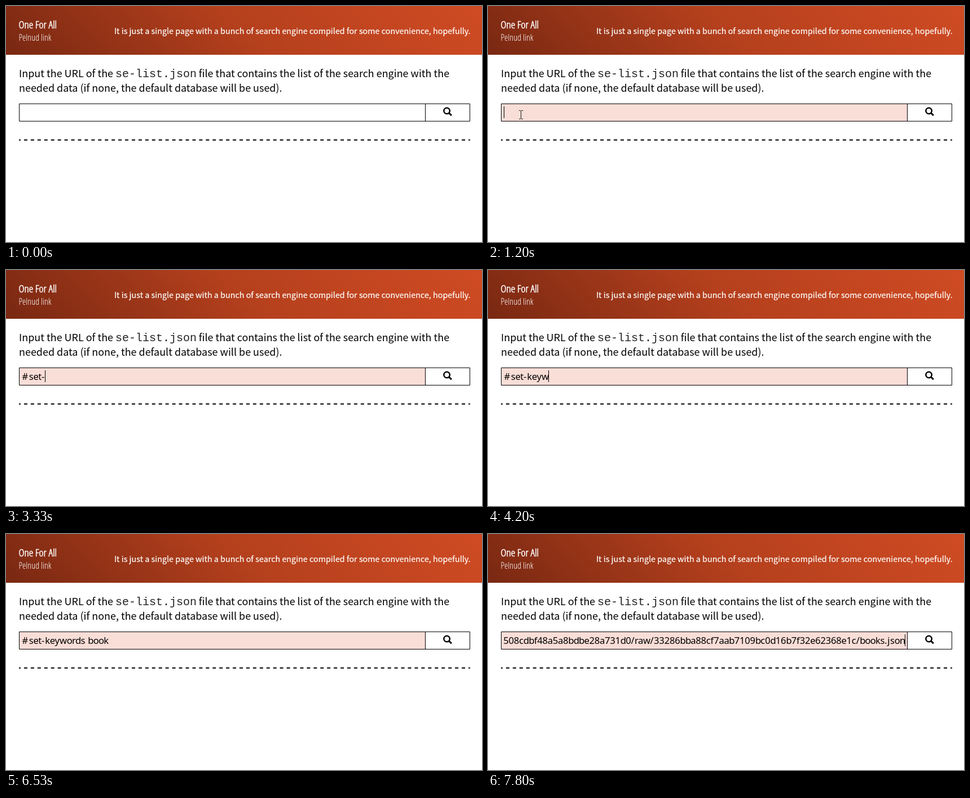
These frames come from a looping animation (844x421 px, 8 s). An HTML page:

```html
<!DOCTYPE html>
<html lang="en">
<head>
<meta charset="utf-8">
<title>One For All</title>
<style>
  html, body { margin: 0; width: 100%; height: 100%; overflow: hidden; background: #fff; }
  svg { display: block; width: 844px; height: 421px; }
  text { white-space: pre; }
  .body { font: 17.94px "Noto Sans CJK JP", "Noto Sans CJK SC", "Noto Sans CJK", sans-serif; }
  .tagline { font-size: 14.35px; fill: #fff; stroke: #fff; stroke-width: .2px; }
  .code { font: 20px "Liberation Mono", "Courier New", monospace; fill: #222; }
  .brand { font-family: "Open Sans Condensed Light", "Open Sans", sans-serif; font-weight: 300; fill: #fff; }
  #title { font-size: 19.2px; stroke: #fff; stroke-width: .6px; }
  #link { font-size: 16px; }
  #typed { font: 16.6px "Noto Sans", "Open Sans", sans-serif; }
</style>
</head>
<body>
<svg viewBox="0 0 844 421" xmlns="http://www.w3.org/2000/svg">
  <defs>
    <linearGradient id="rust" gradientUnits="userSpaceOnUse" x1="189.25" y1="276.25" x2="654.75" y2="-189.25">
      <stop offset="0" stop-color="#792812"/>
      <stop offset=".5" stop-color="#b5401d"/>
      <stop offset="1" stop-color="#cf4b23"/>
    </linearGradient>
    <clipPath id="inner"><rect x="27" y="175" width="714" height="30"/></clipPath>
  </defs>

  <rect width="844" height="87" fill="url(#rust)"/>
  <g class="brand" id="brand" transform="translate(22.5 0)">
    <text id="title" y="40">One For All</text>
    <text id="link" y="62">Pelnud link</text>
  </g>
  <text class="body tagline" x="191.9" y="50">It is just a single page with a bunch of search engine compiled for some convenience, hopefully.</text>

  <text class="body" x="23" y="127">Input the URL of the</text>
  <text class="code" x="194" y="127">se-list.json</text>
  <text class="body" x="341.7" y="127">file that contains the list of the search engine with the</text>
  <text class="body" x="23" y="153">needed data (if none, the default database will be used).</text>

  <rect id="field" x="24" y="175" width="719" height="30" fill="#fff"/>
  <g clip-path="url(#inner)"><text id="typed" y="196"></text></g>
  <rect id="caret" y="179" width="1" height="21"/>
  <path d="M23.5 174.5H822.5V205.5H23.5ZM743.5 174V206" fill="none" stroke="#000"/>
  <g fill="none" stroke="#000">
    <circle cx="781.6" cy="187" r="5.2" stroke-width="2.5"/>
    <path d="M785.5 190.9L789.9 195.3" stroke-width="3"/>
  </g>
  <path id="rule" d="M23 239H823" stroke="#000" stroke-width="2"/>

  <path id="arrow" d="M.5 .5V16.5L4.2 13L6.7 18.6L9 17.6L6.6 12.1H11.7Z" fill="#fff" stroke="#000"/>
  <path id="beam" d="M-3.5 -7.5H-1.2L0 -6.7L1.2 -7.5H3.5M0 -6.7V6.7M-3.5 7.5H-1.2L0 6.7L1.2 7.5H3.5" fill="none" stroke="#111"/>
</svg>
<script>
const LOOP = 8000, FOCUS = 1200, PASTE = 7800, SIZE = 17;
const $ = id => document.getElementById(id);

const KEYS = '#set-keywords books="';
const KEY_TIMES = [2400, 2600, 2800, 2930, 3330, 3530, 3670, 3870, 4200, 4400, 4530,
  4730, 4870, 4930, 6070, 6270, 6400, 6530, 6730, 6930, 7330];
const PASTED = '508cdbf48a5a8bdbe28a731d0/raw/33286bba88cf7aab7109bc0d16b7f32e62368e1c/books.json';
const CARET_OFF = [[0, 1200], [1730, 2270], [2930, 3000], [4930, 5070],
  [5470, 6000], [6530, 6730], [7070, 7330], [7600, 7800]];

// Letter advances in em; digits share the default.
const ADVANCE = { '#': .728, '=': .728, '"': .401, '-': .363, ' ': .313, '/': .382, '.': .303,
  a: .525, b: .553, c: .462, d: .553, e: .527, f: .33, j: .282, k: .498, n: .558,
  o: .543, r: .36, s: .447, t: .334, w: .742, y: .498 };
const advance = c => (ADVANCE[c] || .546) * SIZE;
const measure = s => [...s].reduce((sum, c) => sum + advance(c), 0);

// Pointer stops: time, x, y. Arrow tip outside the field, beam centre inside.
const POINTER = [[730, 12, 199], [800, 18, 198], [870, 29.5, 197], [930, 41.5, 196],
  [1000, 52.5, 195], [1130, 58.5, 194], [1470, 55.5, 194]];
const POINTER_END = 1530;

function setText(s, start) {
  let x = start + .4;
  const xs = [...s].map(c => { const at = x; x += advance(c); return at.toFixed(2); });
  $('typed').setAttribute('x', xs.join(' '));
  $('typed').textContent = s;
}

function place(el, shown, x, y) {
  el.setAttribute('visibility', shown ? 'visible' : 'hidden');
  if (shown) el.setAttribute('transform', `translate(${x} ${y})`);
}

let lastText = null;
function draw(t) {
  const pasted = t >= PASTE;
  const text = pasted ? PASTED : KEYS.slice(0, KEY_TIMES.filter(k => k <= t).length);
  const width = measure(text);
  const start = pasted ? 739 - width : 28;
  if (text !== lastText) setText(lastText = text, start);

  $('field').setAttribute('fill', t >= FOCUS ? '#f9ddd7' : '#fff');
  const hidden = CARET_OFF.some(([from, to]) => t >= from && t < to);
  place($('caret'), !hidden, Math.round(start + width), 0);

  const stop = t < POINTER_END && POINTER.filter(p => p[0] <= t).pop();
  const [, x, y] = stop || [0, 0, 0];
  place($('arrow'), stop && x < 23, x, y);
  place($('beam'), stop && x >= 23, x, y);
}

// Equal dashes and gaps, with half a dash at either end.
const dash = 800 / (67 * 2);
$('rule').setAttribute('stroke-dasharray', dash);
$('rule').setAttribute('stroke-dashoffset', dash / 2);

// Narrow the header face where no condensed cut is available.
if ($('title').getComputedTextLength() > 82)
  $('brand').setAttribute('transform', 'translate(22.5 0) scale(.72 1)');

function tick() {
  draw(performance.now() % LOOP);
  requestAnimationFrame(tick);
}
tick();
</script>
</body>
</html>
```
